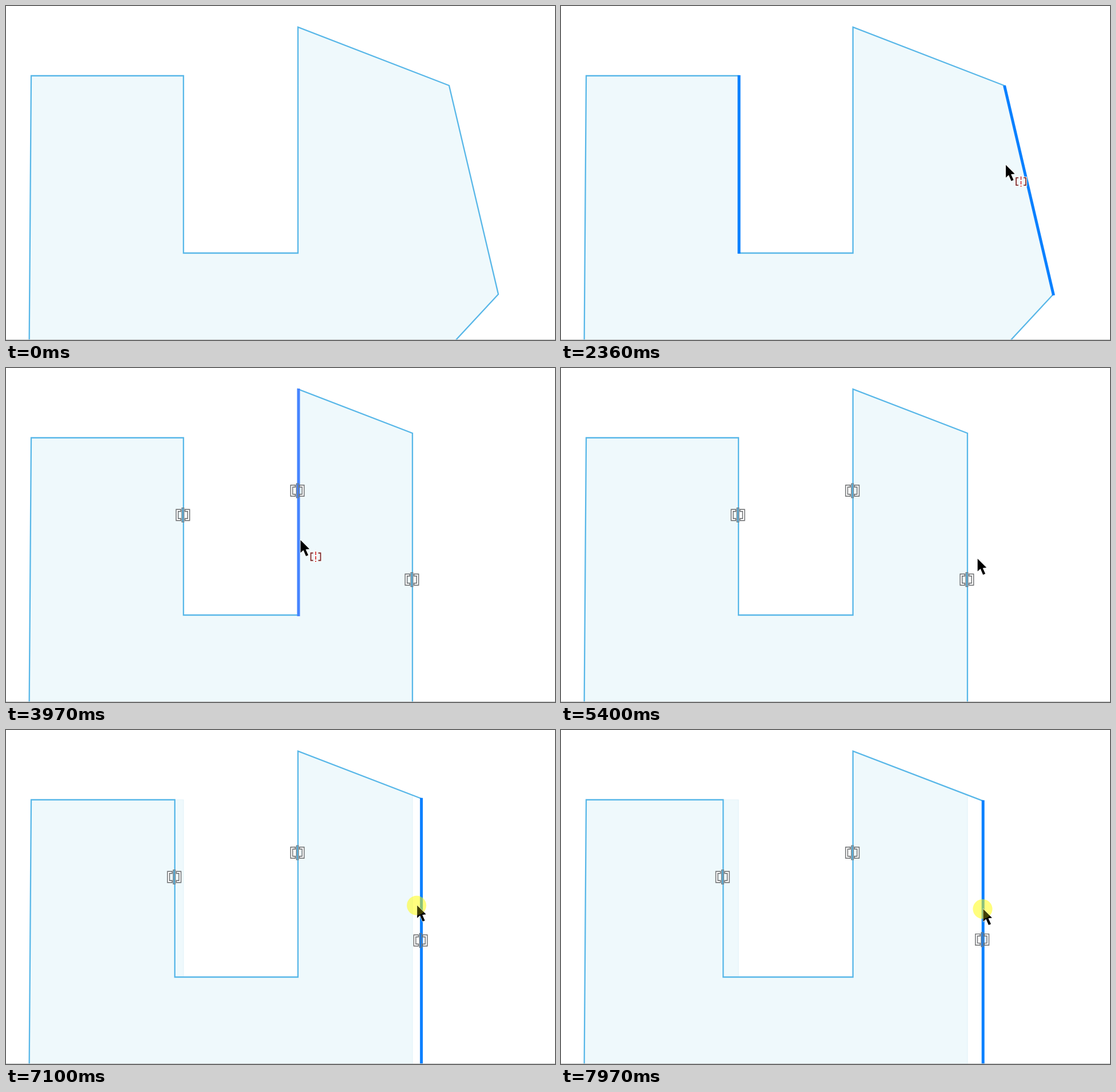
Recreate the animation shown at these times as an HTML page with a canvas. Size 959 by 584 pixels, loop 8000 ms.

```html
<!DOCTYPE html>
<html>
<head>
<meta charset="utf-8">
<style>
html, body { margin: 0; width: 100%; height: 100%; overflow: hidden; background: #fff; }
canvas { display: block; filter: blur(0.5px); }
</style>
</head>
<body>
<canvas id="stage" width="959" height="584"></canvas>
<script>
const ctx = document.getElementById('stage').getContext('2d');
const LOOP = 8000, AXIS = 510, SLOT = 310, RIGHT = 710, FLOOR = 600;
const EDGE = '#58b7e8', HOVER = '#4684ff', PICKED = '#0a80ff';

// Moments of the story, in ms
const ENTER = 70, PICK_SLOT = 1000, PICK_RIGHT = 1880, PICK_AXIS = 3300;
const SOLVED = 3480, LEAVE = 4310, RETURN = 4770, GRAB = 5600;
const LAG = 30, PRESS = 130;

// Eased pointer moves: start, end, destination
const moves = [
  [70, 850, 312, 283], [920, 1660, 776, 280], [1740, 2020, 800, 277],
  [2220, 3030, 508, 289], [3450, 3510, 514, 301], [3970, LEAVE, 830, 600],
  [LEAVE, RETURN, 910, 540], [RETURN, 5540, RIGHT, 314],
  [6000, 6600, 867, 305], [6600, 7200, 706, 307], [7440, 7970, 737, 313]
];

const within = (t, a, b) => t >= a && t < b;

function pointerAt(t) {
  let x = 790, y = 590;
  for (const [start, end, toX, toY] of moves) {
    const u = Math.min(1, Math.max(0, (t - start) / (end - start)));
    const s = u * u * (3 - 2 * u);
    x += (toX - x) * s;
    y += (toY - y) * s;
  }
  return [x, y];
}

function trace(points) {
  ctx.beginPath();
  points.forEach(p => ctx.lineTo(...p));
}

function stroke(color, width) {
  ctx.strokeStyle = color;
  ctx.lineWidth = width;
  ctx.stroke();
}

function line(points, color, width) {
  trace(points);
  stroke(color, width);
}

function outline(slot, right) {
  return [[40.5, FLOOR], [44, 122], [slot, 122], [slot, 432], [AXIS, 432], [AXIS, 37], ...right];
}

function brackets(w, h, lip) {
  ctx.beginPath();
  for (const s of [-1, 1]) {
    ctx.moveTo(s * (w - lip), -h);
    ctx.lineTo(s * w, -h);
    ctx.lineTo(s * w, h);
    ctx.lineTo(s * (w - lip), h);
  }
}

function symmetryMark(x, y, core) {
  ctx.save();
  ctx.translate(x - 1, y);
  brackets(10, 8, 4.5);
  ctx.lineCap = 'square';
  stroke('#686a6c', 5);
  stroke('#fff', 2.2);
  ctx.lineCap = 'butt';
  line([[0, -13], [0, 13]], '#707a80', 4.8);
  line([[0, -12], [0, 12]], core, 2);
  ctx.restore();
}

function toolMark(x, y) {
  ctx.save();
  ctx.translate(x + 27, y + 29);
  brackets(8.5, 6.5, 4);
  stroke('#fff', 4);
  stroke('#7c2a2a', 1.8);
  line([[0, -10], [0, 10]], '#fff', 4);
  ctx.setLineDash([6, 2]);
  line([[0, -9], [0, 9]], '#d23a3a', 1.8);
  ctx.restore();
}

function arrow(x, y) {
  ctx.save();
  ctx.translate(x + 0.5, y);
  trace([[0, 0], [0, 22], [5, 17.5], [9.5, 28], [13.5, 26.3], [9, 16.3], [15.5, 15.5]]);
  ctx.closePath();
  stroke('#fff', 1.2);
  ctx.fillStyle = '#000';
  ctx.fill();
  ctx.restore();
}

function glow(x, y, alpha) {
  ctx.fillStyle = `rgba(255,252,0,${alpha})`;
  ctx.beginPath();
  ctx.arc(x - 0.5, y, 17, 0, 7);
  ctx.fill();
}

function drawShape(t, solved, edge) {
  const drop = edge - RIGHT;
  const top = 114 + 0.385 * drop - 0.0006 * drop * drop;
  const slot = 2 * AXIS - edge;
  const base = solved
    ? outline(SLOT, [[RIGHT, 114], [RIGHT, FLOOR]])
    : outline(SLOT, [[774, 139], [860, 504], [771, FLOOR]]);

  trace(base);
  ctx.fillStyle = '#eff9fc';
  ctx.fill();
  if (edge !== RIGHT) stroke('#e3f3f9', 1.2);
  line(solved ? outline(slot, [[edge, top], [edge, FLOOR]]) : base, EDGE, 2.3);

  const mark = (points, hover, pick, end) => {
    if (within(t, hover, end)) line(points, t < pick ? HOVER : PICKED, 5);
  };
  const axisEdge = [[511, 36], [511, 434]];
  mark(axisEdge, 2890, PICK_AXIS, SOLVED);
  mark(axisEdge, SOLVED, LOOP, 4040);
  mark([[SLOT + 1, 121], [SLOT + 1, 433]], 830, PICK_SLOT, SOLVED);
  mark([[774.5, 139], [860.5, 506]], 1740, PICK_RIGHT, SOLVED);
  mark([[edge + 0.5, top - 1], [edge + 0.5, FLOOR]], 5510, GRAB, LOOP);

  if (solved) {
    symmetryMark(slot, 257, EDGE);
    symmetryMark(AXIS, 214.5, t < 4040 ? HOVER : EDGE);
    symmetryMark(edge, 370 - drop * 0.133, t >= GRAB ? PICKED : EDGE);
  }
}

function drawPointer(t) {
  if (t < ENTER || within(t, LEAVE, RETURN)) return;
  const [x, y] = pointerAt(t);
  const pressed = t >= GRAB ||
    [PICK_SLOT, PICK_RIGHT, PICK_AXIS].some(p => within(t, p, p + PRESS));
  if (pressed) glow(x, y, 0.35);
  if (t < LEAVE) toolMark(x, y);
  arrow(x, y);
  if (pressed) glow(x, y, 0.25);
}

function draw(t) {
  ctx.fillStyle = '#fff';
  ctx.fillRect(0, 0, 959, 584);
  drawShape(t, t >= SOLVED, t < GRAB + LAG ? RIGHT : pointerAt(t - LAG)[0]);
  ctx.fillStyle = '#bfc1c2';
  ctx.fillRect(0, 583, 959, 1);
  drawPointer(t);
}

const start = performance.now();
function tick() {
  draw((performance.now() - start) % LOOP);
  requestAnimationFrame(tick);
}
tick();
</script>
</body>
</html>
```
